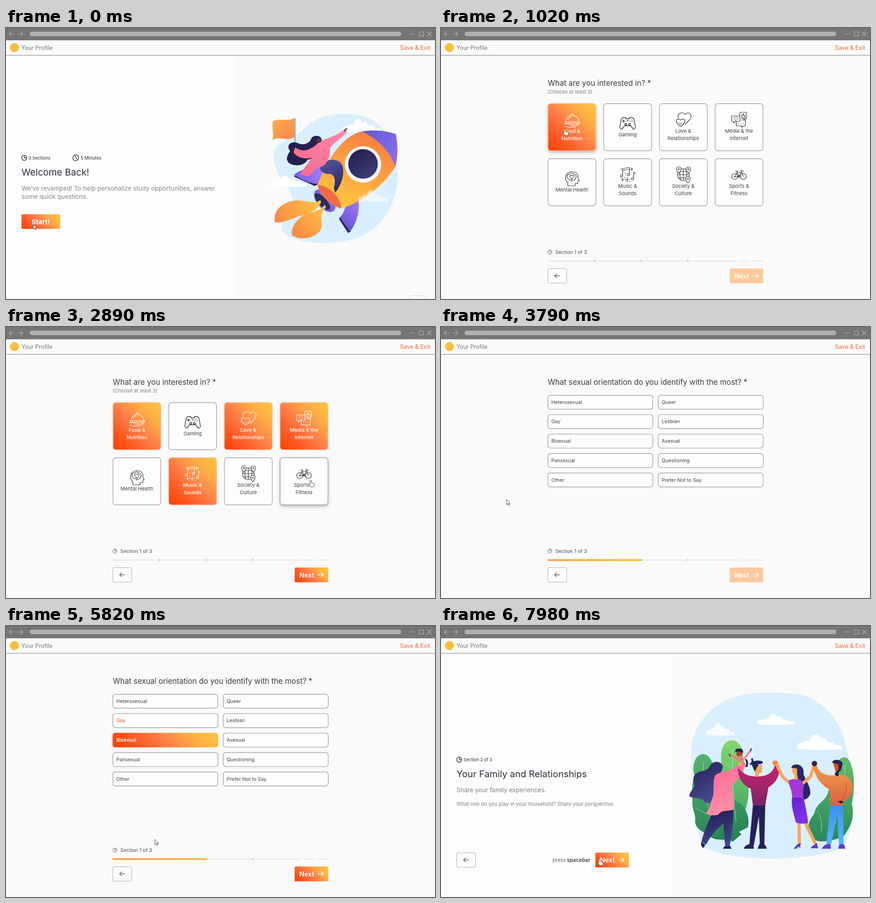
An HTML page with a canvas that plays this animation: 942 by 595 pixels, repeating every 8 s.

```html
<!DOCTYPE html>
<html lang="en">
<head>
<meta charset="utf-8">
<title>Your Profile</title>
<style>
html, body { margin: 0; width: 100%; height: 100%; overflow: hidden; background: #fafafa; }
canvas { display: block; }
</style>
</head>
<body>
<canvas id="stage" width="942" height="595"></canvas>
<script>
const W = 942, H = 595, LOOP = 8000;
const FONT = 'Inter, "Open Sans", sans-serif';
const main = document.getElementById('stage').getContext('2d');
const spare = Object.assign(document.createElement('canvas'), { width: W, height: H }).getContext('2d');
let g = main;

const clamp = v => Math.max(0, Math.min(1, v));
const span = (t, a, b) => clamp((t - a) / (b - a));
const ease = p => p * p * (3 - 2 * p);

// ---- drawing helpers ----
function lin(x0, y0, x1, y1, ...colors) {
  const l = g.createLinearGradient(x0, y0, x1, y1);
  colors.forEach((c, i) => l.addColorStop(i / (colors.length - 1), c));
  return l;
}

function hot(x, y, w, h) {
  const cx = x + w / 2, cy = y + h / 2, d = (w + h) / 4;
  return lin(cx - d, cy + d, cx + d, cy - d, '#ff3d00', '#ff5a24', '#ff8049', '#ffae45', '#ffc63c');
}

function shape(fill, d) {
  g.fillStyle = fill;
  g.fill(new Path2D(d));
}

function line(color, width, d) {
  g.strokeStyle = color;
  g.lineWidth = width;
  g.lineCap = g.lineJoin = 'round';
  g.stroke(new Path2D(d));
}

function rect(x, y, w, h, r, fill, border, bw = 1) {
  g.beginPath();
  g.roundRect(x, y, w, h, r);
  if (fill) { g.fillStyle = fill; g.fill(); }
  if (border) { g.strokeStyle = border; g.lineWidth = bw; g.stroke(); }
}

function oval(fill, x, y, rx, ry = rx, turn = 0) {
  g.beginPath();
  g.ellipse(x, y, rx, ry, turn, 0, Math.PI * 2);
  g.fillStyle = fill;
  g.fill();
}

function text(s, x, y, size, color, weight = 400, align = 'left') {
  g.font = `${weight} ${size}px ${FONT}`;
  g.textAlign = align;
  g.fillStyle = color;
  g.fillText(s, x, y);
}

function at(x, y, draw, sx = 1, sy = sx) {
  g.save();
  g.translate(x, y);
  g.scale(sx, sy);
  draw();
  g.restore();
}

function pie(x, y, r, color, width) {
  at(x, y, () => line(color, width, `M${-r} 0a${r} ${r} 0 1 0 ${2 * r} 0a${r} ${r} 0 1 0 ${-2 * r} 0M0 ${-r}V0H${r}`));
}

function cloud(x, y, w, h, fill = '#fff') {
  at(x, y, () => shape(fill, 'M0 20C-1 14 6 13 13 14C17 9 24 10 29 11C30-2 47-3 51 7C58 3 66 8 68 14C76 11 82 13 84 18C92 16 100 18 99 24C70 25 30 25 3 24Q0 23 0 20z'), w / 99, h / 25);
}

function arrow(x, y, dir, color, width = 1.6) {
  at(x, y, () => line(color, width, 'M-5.5 0H5.5M1-4.5L5.5 0L1 4.5'), dir, 1);
}

// ---- pointer ----
function track(keys, t) {
  let i = 0;
  while (i < keys.length - 1 && t >= keys[i + 1][0]) i++;
  const a = keys[i], b = keys[i + 1] || a;
  const p = a === b ? 0 : ease(span(t, a[0], b[0]));
  return { x: a[1] + (b[1] - a[1]) * p, y: a[2] + (b[2] - a[2]) * p, hand: a[3] };
}

const over = (p, x, y, w, h) => p.x > x && p.x < x + w && p.y > y && p.y < y + h;

function pointer(p) {
  const d = p.hand
    ? 'M-1.5 1.5a1.5 1.5 0 0 1 3 0V6L6 7Q8 7.500 8 10Q8 13 6.500 15H.5L-3.500 9.500Q-3 7.500-1.500 9z'
    : 'M0 0V11L2.600 8.600L4.400 12.600L6.200 11.900L4.500 8H8z';
  at(p.x, p.y, () => { shape('#fff', d); line('#444', 1, d); });
}

// ---- shared parts ----
function chrome() {
  rect(0, 0, W, 27, 0, '#757575');
  rect(52, 8, 816, 10, 5, '#b0b0b0');
  line('#b8b8b8', 1.1, 'M18 13H7M12 8L7 13L12 18M26 13H37M32 8L37 13L32 18M886 13H898M907.500 8.500H916.500V17.500H907.500zM925 8.500L934 17.500M934 8.500L925 17.500');
  rect(0, 27, W, 33, 0, '#fafafa');
  rect(0, 59.2, W, 1.6, 0, '#a4a4a4');
  oval('#fbbf3d', 18.5, 43, 10);
  text('Your Profile', 34, 48, 12.4, '#757575');
  text('Save & Exit', 865, 47.5, 12.7, '#f4692d');
}

function backButton(x, y) {
  rect(x + .5, y + .5, 41.5, 31.5, 2.5, '#fdfdfd', '#aaa');
  arrow(x + 21, y + 16, -1, '#616161', 1.4);
}

function nextButton(x, y, on) {
  rect(x, y, 73.5, 32.5, 2, on ? hot(x, y, 73.5, 32.5) : '#fec99d');
  text('Next', x + 10, y + 21.5, 14.5, '#fff', 600);
  arrow(x + 57.5, y + 16, 1, '#fff', 1.7);
}

function footer(fill, on) {
  pie(239, 492, 4.4, '#757575', 1.1);
  text('Section 1 of 3', 251, 496, 10.9, '#4d4d4d');
  for (const [x, w] of [[234, 415], [655, 23], [685, 23]]) rect(x, 510, w, 3.4, 0, '#ededed');
  for (const x of [336.5, 439, 541.5]) rect(x, 509.5, 1.2, 4, 0, '#8a8a8a');
  if (fill) rect(234, 509.7, 415 * fill, 4, 0, lin(234, 0, 234 + 415 * fill, 0, '#ffa34b', '#ffb93f'));
  backButton(234, 528);
  nextButton(634, 528, on);
}

function split() {
  rect(0, 60, W, H, 0, '#fafafa');
  rect(0, 60, 507, H, 0, '#fdfdfd');
}

// ---- opening page ----
function rocket() {
  shape('#daeffd', 'M588 278C590 246 632 246 662 214C700 181 775 180 812 207C852 236 862 285 860 330C856 400 815 448 762 464C705 478 622 474 606 443C600 424 630 402 628 374C625 345 586 325 588 278z');
  cloud(578, 325, 83, 24);
  cloud(738, 199, 86, 31);
  line('#999', 2.2, 'M634.500 199V264');
  shape(lin(590, 200, 630, 245, '#ffa94a', '#f5894b'), 'M586 205C600 196 616 207 633 198V240C617 250 602 236 585 246C590 234 583 220 586 205z');
  shape('#29265a', 'M632 326L678 347L690 340L640 320z');
  shape(lin(640, 330, 700, 310, '#7d60e8', '#a680fa'), 'M632 322C650 309 680 300 707 306L692 341C680 345 655 338 632 322z');
  shape('#29265a', 'M731 419L751 450L757 447L748 398z');
  shape(lin(740, 430, 775, 390, '#6a55d6', '#9d78f2'), 'M774 380C778 405 767 434 755 447L734 417C740 408 744 398 746 391z');
  oval(lin(685, 390, 715, 365, '#6450cf', '#9a78f2'), 700, 379, 30, 17, .83);
  oval('#2b2b5e', 695, 381, 23, 9, .83);
  shape(lin(685, 380, 590, 420, '#ffc241', '#f98a47'), 'M690 378C674 389 652 374 628 380C600 386 587 406 590 426C606 431 628 417 652 411C674 406 687 395 692 382z');
  shape(lin(700, 392, 640, 460, '#ffc241', '#f98a47'), 'M699 388C690 406 665 402 648 415C635 425 625 440 628 455C646 468 682 462 692 441C698 425 684 412 703 393z');
  shape(lin(800, 228, 738, 390, '#f77d42', '#fda142', '#ffc641'), 'M684 345C700 300 735 236 783 227L856 232C862 260 860 285 855 304C830 345 780 385 735 396C712 388 690 368 684 345z');
  shape('#f26a45', 'M684 345C706 343 739 374 735 396C714 390 690 368 684 345z');
  shape(lin(790, 225, 858, 300, '#6558d8', '#8d72ea'), 'M782 227C805 223 835 225 855 233C861 258 860 283 855 304C843 270 815 243 782 227z');
  oval('#fafafa', 784, 299.5, 40);
  oval(lin(765, 270, 800, 330, '#252150', '#3c3c78'), 784, 298.5, 32.5);
  cloud(774, 356, 64, 25, 'rgba(255,255,255,.55)');
  shape('#24214f', 'M670 244C672 235 690 234 693 244L688 262C684 276 678 288 662 289C657 303 632 305 621 296C612 287 620 276 624 270C613 258 627 245 644 254C656 258 666 252 670 244z');
  shape(lin(690, 295, 725, 358, '#5554a0', '#2c2960'), 'M690 302C704 285 732 285 739 303C744 322 736 342 726 358L720 351C725 333 721 322 711 320C697 322 686 312 690 302z');
  shape(lin(650, 320, 745, 225, '#f56e91', '#ff86a7'), 'M688 250C705 242 724 238 744 222L749 228C737 242 719 252 711 264C714 284 704 304 686 306C677 311 672 319 664 326L647 322C648 312 662 302 671 285C654 289 638 283 631 273L635 262C655 277 674 264 688 250z');
  shape('#59304b', 'M682 244Q690 240 694 246L690 252L681 252z');
  line('#292650', 2.4, 'M743 226L748 221');
  shape('#24214f', 'M720 350L727 352L723 362z');
}

function welcome(t) {
  split();
  rect(886.5, 587.5, 34, 20, 1, '#fdfdfd', '#d4d4d4');
  rocket();
  pie(40, 285, 5.6, '#2d2d35', 1.4);
  at(153, 285, () => line('#2d2d35', 1.4, 'M-6.500 0a6.500 6.500 0 1 0 13 0a6.500 6.500 0 1 0-13 0M0-4V0L3 2.500'));
  text('3 Sections', 49.5, 288.8, 9.6, '#2d2d35');
  text('5 Minutes', 164, 288.8, 9.8, '#2d2d35');
  text('Welcome Back!', 34, 323.5, 20.4, '#2d2d3a');
  text('We’ve revamped! To help personalize study opportunities, answer', 34, 356.5, 13.65, '#858585');
  text('some quick questions.', 34, 374.5, 13.75, '#858585');
  rect(34, 409, 85, 32, 2, hot(34, 409, 85, 32));
  text('Start!', 56, 430.5, 14.8, '#fff', 700);
  pointer({ x: 60, y: 431 });
}

// ---- interest tiles ----
const HEART = 'M0 9C-16-1-9-12 0-5C9-12 16-1 0 9z';
const icons = {
  food: c => line(c, 1.2, 'M-13 5a14 14 0 0 1 28 0M-15 5H17V8H-15zM-1.500-9a2.500 2.500 0 1 1 4 0M-8 0Q-6-5-2-6M-16 10L-10 9Q-5 9-3 11H3Q5 13 2 14H-4M4 13L13 9Q16 10 13 12L4 17H-8L-16 14'),
  game: c => line(c, 1.4, 'M-10-13H-4V-10H4V-13H10Q14-12 15-5L17 8Q16 14 12 12L7 5H-7L-12 12Q-16 14-17 8L-15-5Q-14-12-10-13zM-9-8V-2M-12-5H-6M-2-6H2M8-8V-7.500M8-3V-2.500M5-5H5.500M11-5H11.500M-6 2a2 2 0 1 0 4 0a2 2 0 1 0-4 0M2 2a2 2 0 1 0 4 0a2 2 0 1 0-4 0'),
  love(c) {
    line(c, 1.2, 'M-11-3C-14-14-2-19 4-11C12-20 22-10 14 0L4 11');
    at(-6, 6, () => line(c, 1.2, HEART + 'M-4 0V.3M4 0V.3M-3 3Q0 5 3 3'));
  },
  media(c) {
    line(c, 1.2, 'M2-8V-16H16V-2H13V1L9-2H6M-16-8H2V4H-8L-12 8V4H-16zM-6 4V14H6V17L10 14H14V1H6M-1 8H-.5M4 8H4.500M9 8H9.500M6-9V-4H13V-9H10V-13L7-9z');
    at(-7, -2, () => line(c, 2, HEART), .45);
  },
  mind(c) {
    line(c, 1.2, 'M-9 16V9C-18 2-15-15 0-15C11-15 14-8 13-2L16 5H13V11H7V16zM-9 0C-13-4-9-11-5-10C-2-14 3-12 4-10C9-10 11-4 8-1C8 4 2 5 0 2L-1 6M-9 0Q-6 4-2 2');
    at(0, -4, () => line(c, 2.2, HEART), .5);
  },
  music: c => line(c, 1.2, 'M-11 2V-13L4-16V-1M-11-9L4-12M-16 3a2.500 2.500 0 1 0 5 0a2.500 2.500 0 1 0-5 0M-1 0a2.500 2.500 0 1 0 5 0a2.500 2.500 0 1 0-5 0M13 8V-6Q17-4 16-1M8 9a2.500 2.500 0 1 0 5 0a2.500 2.500 0 1 0-5 0M9-15V-9M6-12H12M-11 8V14M-14 11H-8M-1 6V16M-6 11H4M-5-4V-2M-14-13V-11M-7 6L-6 7M5 15L6 16'),
  globe(c) {
    line(c, 1.2, 'M-13 0a13 13 0 1 0 26 0a13 13 0 1 0-26 0M0-13V13M-6-11Q-10 0-5 12M6-11Q10 0 5 12M-13 0H13M-11-7H11M-11 7H11');
    const pin = 'M0 8C-8-1-5-6 0-6C5-6 8-1 0 8z';
    for (const [x, y] of [[-10, -11], [11, -11], [10, 10]]) at(x, y, () => {
      shape('#fdfdfd', pin);
      line(c, 1.2, pin + 'M-1.500-1a1.500 1.500 0 1 0 3 0a1.500 1.500 0 1 0-3 0');
    });
  },
  bike: c => line(c, 1.2, 'M-16 4a6.500 6.500 0 1 0 13 0a6.500 6.500 0 1 0-13 0M3 4a6.500 6.500 0 1 0 13 0a6.500 6.500 0 1 0-13 0M-9.500 4L-4-5H5L0 4zM0 4L-5-8H-8M-5-8H-2M9.500 4L4-9H8Q10-7 8-6M-11 4a1.500 1.500 0 1 0 3 0M-2 4a2 2 0 1 0 4 0a2 2 0 1 0-4 0')
};

// icon, label lines, time of choice
const tiles = [
  ['food', ['Food &', 'Nutrition'], 1020],
  ['game', ['Gaming']],
  ['love', ['Love &', 'Relationships'], 1950],
  ['media', ['Media & the', 'Internet'], 2440],
  ['mind', ['Mental Health']],
  ['music', ['Music &', 'Sounds'], 1540],
  ['globe', ['Society &', 'Culture']],
  ['bike', ['Sports &', 'Fitness']]
];

const tilePath = [
  [0, 60, 431], [430, 60, 431], [720, 272, 221, 1], [1070, 272, 221, 1], [1290, 400, 343, 1],
  [1560, 400, 343, 1], [1780, 518, 226, 1], [2190, 518, 226, 1], [2400, 642, 224, 1],
  [2730, 642, 224, 1], [2890, 669, 336, 1], [2940, 669, 342, 1], [3090, 670, 537, 1]
];

function interests(t) {
  const p = track(tilePath, t);
  rect(0, 60, W, H, 0, '#fafafa');
  text('What are you interested in? *', 234.5, 127, 16.6, '#3c3c43');
  text('(Choose at least 3)', 234, 144, 11, '#808080');
  tiles.forEach(([icon, label, when], i) => {
    const x = 235 + 122.3 * (i % 4), y = i < 4 ? 166 : 287;
    const on = t >= when, ink = on ? '#fff' : '#333', cx = x + 52.5;
    const one = label.length === 1;
    g.save();
    if (over(p, x, y, 105, 103)) {
      g.shadowColor = 'rgba(0,0,0,.3)';
      g.shadowBlur = 7;
      g.shadowOffsetY = 3;
    }
    rect(x, y, 105, 103.5, 6, on ? hot(x, y, 105, 103.5) : '#fdfdfd');
    g.restore();
    rect(x, y, 105, 103.5, 6, null, on ? '#ffb795' : '#a3a3a3', 1.4);
    at(cx, y + (one ? 43.5 : 35), () => icons[icon](ink));
    label.forEach((s, k) => text(s, cx, y + (one ? 72 : 64 + 16.3 * k), 11, on ? '#fff' : '#404040', on ? 500 : 400, 'center'));
  });
  footer(0, t >= 1950);
  pointer(p);
}

// ---- option list ----
const options = ['Heterosexual', 'Queer', 'Gay', 'Lesbian', 'Bisexual', 'Asexual', 'Pansexual', 'Questioning', 'Other', 'Prefer Not to Say'];
const listPath = [
  [0, 670, 537, 1], [3540, 670, 537], [3790, 144, 379], [3940, 250, 247, 1],
  [4190, 250, 247, 1], [4290, 252, 208, 1], [4550, 252, 208, 1], [4800, 256, 247, 1],
  [5360, 256, 247], [5590, 113, 345], [5820, 327, 469], [6080, 670, 537, 1]
];

function orientation(t) {
  const p = track(listPath, t);
  const pick = t >= 5210 ? 'Bisexual' : t >= 4290 ? 'Gay' : '';
  rect(0, 60, W, H, 0, '#fafafa');
  text('What sexual orientation do you identify with the most? *', 234.5, 127, 16.62, '#3c3c43');
  options.forEach((s, i) => {
    const x = i % 2 ? 477 : 234.7, y = 149.7 + 42.7 * (i >> 1), w = 230.5;
    const on = s === pick;
    const warm = over(p, x, y, w, 31) || (s === 'Gay' && t >= 5210 && t < 6180);
    if (on) rect(x - .5, y - .5, w + 1.3, 32, 5.5, hot(x, y, w, 31));
    else rect(x, y, w, 30.8, 5.5, '#fdfdfd', '#a3a3a3', 1.4);
    text(s, x + 7.5, y + 19, 10.85, on ? '#fff' : warm ? '#d9501e' : '#404040', on ? 600 : 400);
  });
  footer(.5 + .25 * ease(span(t, 6200, 6480)), t >= 4290);
  pointer(p);
}

// ---- family page ----
function bushes() {
  shape(lin(640, 252, 640, 420, '#83d66c', '#45ab66'), 'M640 251C618 250 611 280 617 305C606 330 612 380 622 460L652 440C676 400 684 350 664 325C666 285 664 254 640 251z');
  shape(lin(575, 282, 620, 470, '#57b36d', '#258355'), 'M576 281C557 282 550 308 557 330C548 350 553 365 552 385C551 405 560 412 558 428C558 448 580 452 590 462C606 475 630 464 640 474L660 457L654 452L674 442C682 405 650 372 628 385C618 360 606 345 600 340C601 310 595 283 576 281z');
  shape(lin(885, 288, 850, 480, '#62bb6d', '#27875a'), 'M887 288C866 290 866 315 865 332C850 345 854 362 846 374C838 388 822 392 820 412C806 428 802 448 811 460C822 484 870 468 884 462C900 440 909 420 902 390C912 350 906 292 887 288z');
  line('rgba(225,250,225,.7)', 1, 'M576 300Q572 370 602 440M563 322L575 340M591 322L576 345M640 270Q638 360 648 430M626 300L640 318M656 300L640 325M887 305Q890 380 855 445M826 405Q840 425 835 450M876 330L888 345M560 400L588 415M628 240L624 251');
}

function mother(navy) {
  shape(lin(560, 320, 600, 385, '#2c2a63', '#4b4e95'), 'M592 305C600 294 618 297 619 310C617 320 610 326 609 336C602 350 609 362 601 370C602 385 590 393 579 386C572 376 557 380 545 374C545 364 556 358 556 349C555 340 551 330 562 323C572 315 584 322 592 305z');
  shape(lin(590, 410, 610, 485, navy, '#41458c'), 'M600 402L642 402C643 430 637 462 634 484L624 485L620 434C603 446 592 462 582 480L572 474C578 446 590 425 600 402z');
  shape(lin(600, 320, 640, 410, '#ff6f9c', '#ff91a8'), 'M602 328C612 318 640 322 654 301L668 303C662 326 648 343 637 352C646 375 642 390 643 403C630 408 618 402 609 414C600 417 590 416 582 411C592 398 592 385 598 372C600 358 596 340 602 328z');
  shape(navy, 'M571 474L580 480L577 487Q570 486 571 474zM622 484L635 483L638 489H619z');
}

function child(navy) {
  line('#f07f7d', 4, 'M634 283L646 288M666 291L680 273M654 292L655 303M662 294L668 308');
  line('#f07f7d', 8, 'M648 289L662 293');
  line(navy, 2, 'M633 281L635 286M681 269L680 274');
  oval('#a3453f', 655, 280, 6.5);
  shape('#2a2050', 'M646 277Q645 268 655 269Q665 268 663 279Q654 274 646 277z');
  line(navy, 4, 'M671 308Q674 300 670 294M680 303Q686 300 683 292');
}

function father(navy, skin) {
  shape(navy, 'M685 392H712L710 481H700L698 418L687 481H677z');
  shape(navy, 'M665 488Q668 481 677 479H686L687 489H665zM695 489L699 479H709Q715 483 715 489z');
  shape(lin(700, 310, 698, 394, '#c3246f', '#7c2468'), 'M652 310C664 328 680 331 698 330C718 330 730 320 733 305L743 306C745 328 736 345 719 354L712 394H685L680 357C664 350 651 335 652 310z');
  shape(skin, 'M689 305H705L705 319Q704 324 699 322L698 331H690z');
  shape(navy, 'M683 306C678 297 692 293 706 297Q708 304 698 303L694 310L689 320z');
  oval(skin, 656, 304, 4);
  oval('#f28a4a', 734, 301, 6);
}

function aunt(skin) {
  shape('#292766', 'M771 307C785 298 799 310 796 325C800 338 812 352 811 368C808 379 798 383 792 380C784 365 778 345 780 322z');
  line(skin, 7, 'M738 306L750 331L767 346M794 346L812 330L819 306');
  line(skin, 7, 'M786 430L787 478M799 430L822 478');
  shape('#a437d6', 'M763 339C775 334 785 336 792 339L797 352C793 363 796 372 796 380L771 379C772 362 764 352 763 339z');
  shape(lin(775, 380, 800, 434, '#6a20d8', '#8432ea'), 'M771 377H796C800 395 805 415 806 433C796 434 787 435 779 431C775 412 768 395 771 377z');
  shape(skin, 'M771 310L782 311V326L784 337H776V326Q770 326 771 310z');
  shape('#292766', 'M769 312C772 300 790 302 788 318Q779 310 769 312z');
  shape('#5b3cd8', 'M774 489L784 478L790 477L788 489L786 484L780 489zM816 483L825 476L828 488H811z');
}

function uncle() {
  shape(lin(860, 395, 875, 480, '#3f8df0', '#57b7fb'), 'M855 390H883L884 481H874L870 418L856 481H846z');
  shape('#5b3cd8', 'M836 488Q842 480 848 479H855L856 489H836zM872 489L875 479H884Q888 484 887 489z');
  shape(lin(870, 325, 870, 395, '#ee9049', '#d9623f'), 'M817 308L825 306C831 324 846 329 862 328C888 322 903 333 905 358C902 373 892 382 883 386L883 394H855L853 359C836 350 821 332 817 308z');
  line('#b54d38', 1.3, 'M889 345Q893 360 882 380');
  shape('#2a2050', 'M871 386Q877 381 884 386L879 390z');
  shape('#d54c29', 'M861 301H875L876 319Q870 323 866 318z');
  shape('#2a2050', 'M859 300C860 292 878 291 882 302L879 315L873 322V330Q867 330 864 325L873 315L873 304z');
  oval('#3a2346', 820, 302, 6);
}

function family() {
  const navy = '#24215a', skin = '#f7a65c';
  shape('#daeffd', 'M550 272C552 215 600 156 682 148C722 145 760 147 790 150C848 165 884 220 892 275C911 350 914 440 884 484C830 517 640 522 575 485C556 430 549 340 550 272z');
  cloud(695, 193, 83, 24);
  cloud(782, 238, 99, 34);
  cloud(583, 212, 62, 29, 'rgba(255,255,255,.75)');
  bushes();
  mother(navy);
  child(navy);
  father(navy, skin);
  aunt(skin);
  uncle();
}

const homePath = [[0, 685, 544], [7210, 685, 544], [7460, 345, 515, 1], [7620, 345, 515, 1], [7940, 348, 511, 1]];

function household(t) {
  split();
  family();
  pie(40, 293.5, 5.6, '#2d2d35', 1.4);
  text('Section 2 of 3', 49.5, 297.3, 9.55, '#2d2d35');
  text('Your Family and Relationships', 34, 332, 20.3, '#2d2d3a');
  text('Share your family experiences.', 34, 364.5, 13.5, '#808080');
  text('What role do you play in your household? Share your perspective.', 34, 394.5, 11.2, '#808080');
  backButton(34, 497.5);
  text('press', 245, 517.5, 11.2, '#666');
  text('spacebar', 276.5, 517.5, 11.1, '#555', 700);
  nextButton(339, 497.5, true);
  pointer(track(homePath, t));
}

// ---- timeline: page, fade start, fade end ----
const scenes = [[welcome, -2, -1], [interests, 250, 560], [orientation, 3150, 3430], [household, 6560, 6850]];

function layer(draw, t, alpha) {
  if (alpha < 1) {
    g = spare;
    g.clearRect(0, 0, W, H);
  }
  draw(t);
  if (alpha < 1) {
    g = main;
    g.globalAlpha = alpha;
    g.drawImage(spare.canvas, 0, 0);
    g.globalAlpha = 1;
  }
}

function frame(now) {
  const t = now % LOOP;
  const shown = scenes.map(([draw, a, b]) => [draw, span(t, a, b)]).filter(s => s[1] > 0);
  const base = shown.map(s => s[1]).lastIndexOf(1);
  shown.slice(base).forEach(([draw, alpha]) => layer(draw, t, alpha));
  chrome();
  requestAnimationFrame(frame);
}
requestAnimationFrame(frame);
</script>
</body>
</html>
```
